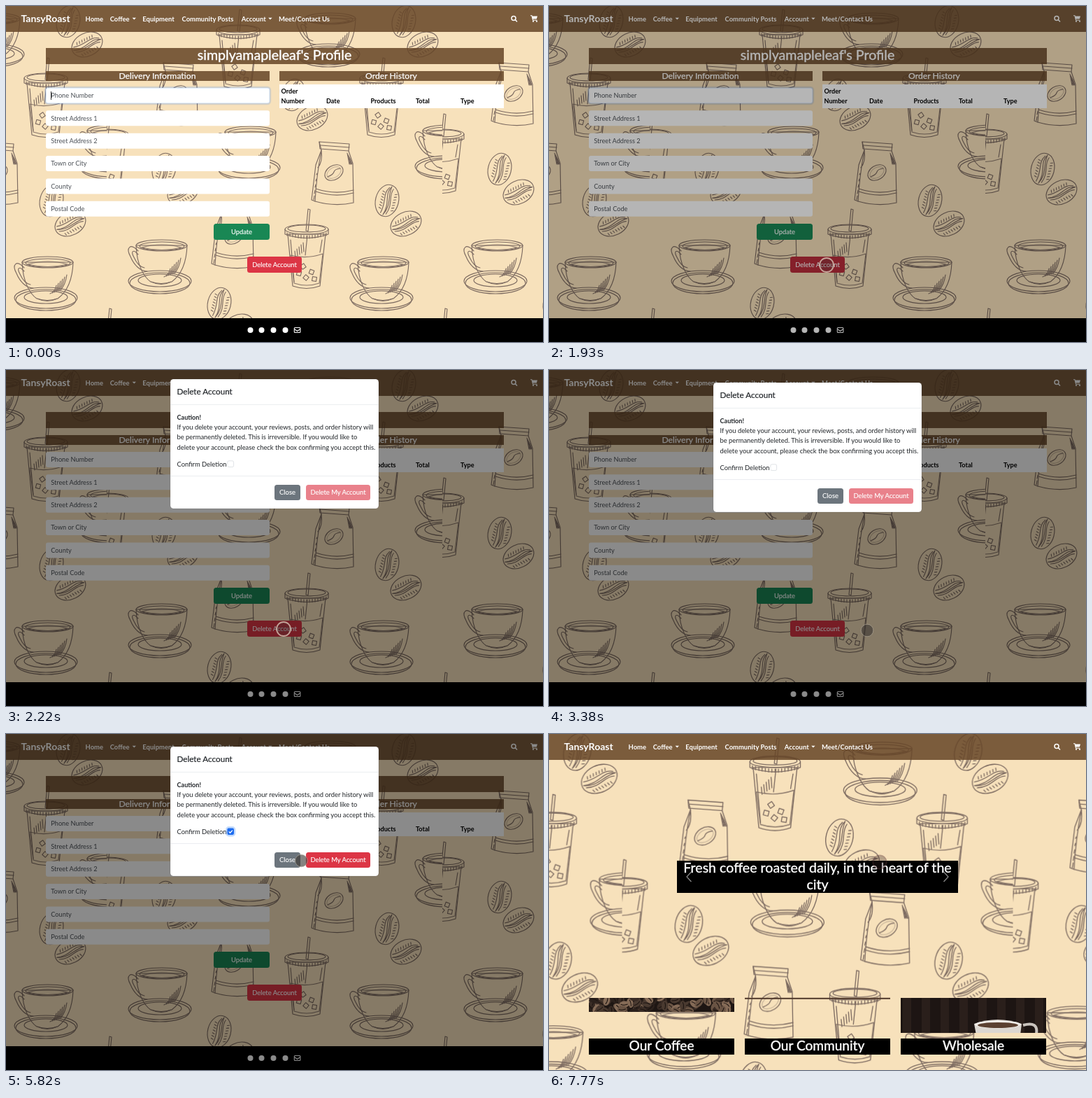
Write an HTML page that moves like this. It is 768 by 480 pixels and loops after 8000 ms.

```html
<!DOCTYPE html>
<html lang="en">
<head>
<meta charset="utf-8">
<title>Profile page</title>
<style>
  html, body { margin: 0; width: 100%; height: 100%; overflow: hidden; background: #f7e1bb; }
  svg { display: block; width: 768px; height: 480px; }
  text { font-family: Lato, "Open Sans", sans-serif; white-space: pre; }
  .ink { fill: none; stroke: #7c6a60; stroke-width: 1.15; stroke-linecap: round; stroke-linejoin: round; }
  .ink .dark { fill: #7c6a60; }
  .ink .paper { fill: #f7e1bb; }
  .ink .thin { stroke-width: .7; }
</style>
</head>
<body>
<svg id="stage" viewBox="0 0 768 480" xmlns="http://www.w3.org/2000/svg"></svg>
<script>
const BROWN = 'rgba(103,70,40,.86)', WHITE = '#fff', GREY = '#4c5157', INK = '#212529';
const LOOP = 8000;

// ---- drawing helpers -------------------------------------------------
const rect = (x, y, w, h, fill, rx = 0, more = '') =>
  `<rect x="${x}" y="${y}" width="${w}" height="${h}" rx="${rx}" fill="${fill}" ${more}/>`;
const path = (d, more = '') => `<path d="${d}" ${more}/>`;
const ellipse = (x, y, rx, ry, more = '') =>
  `<ellipse cx="${x}" cy="${y}" rx="${rx}" ry="${ry}" ${more}/>`;
const group = (body, more = '') => `<g ${more}>${body}</g>`;
const text = (x, y, size, str, { fill = WHITE, mid = false, weight = 400, heavy = 0 } = {}) =>
  `<text x="${x}" y="${y}" font-size="${size}" font-weight="${weight}" fill="${fill}"` +
  (mid ? ' text-anchor="middle"' : '') +
  (heavy ? ` stroke="${fill}" stroke-width="${heavy}"` : '') + `>${str}</text>`;
const repeat = (n, fn) => Array.from({ length: n }, (_, i) => fn(i)).join('');
const place = (list, id) => list.map(([x, y]) => `<use href="#${id}" x="${x}" y="${y}"/>`).join('');

// ---- coffee wallpaper ------------------------------------------------
const cup =
  ellipse(0, 60, 45, 15, 'class="paper"') + ellipse(0, 63, 43, 15) + ellipse(0, 59, 31, 9, 'class="thin"') +
  path('M-31 17C-42 5-49 12-42 25C-37 37-28 46-18 46M-31 22C-38 14-42 17-37 26C-33 35-27 40-22 41') +
  path('M-34 9C-33 38-22 55-13 61Q2 66 17 61C28 53 38 38 39 9Z', 'class="paper"') +
  path('M-12 61Q2 68 16 61') +
  ellipse(2.5, 9, 36.5, 8, 'class="paper"') + ellipse(3, 10, 32, 6) +
  path('M-26 12Q3 4 31 12Q3 19-26 12Z', 'class="dark" opacity=".85"') +
  repeat(6, i => path(`M${30 - i * 3} ${27 + i * 3}q-2 ${14 - i} -9 ${22 - i * 2}`, 'class="thin"'));

const glass =
  path('M-27 36L-20 110Q0 117 19 110L27 36Z', 'class="paper"') +
  path('M-23 66Q0 72 23 64L18 106Q0 112-18 106Z', 'class="dark" opacity=".88"') +
  [[-11, 92, 15], [-1, 98, 40], [7, 90, 20], [-5, 82, 55], [11, 100, 10]].map(([x, y, a]) =>
    `<rect x="${x - 3}" y="${y - 3}" width="6" height="6" class="paper" transform="rotate(${a} ${x} ${y})"/>`).join('') +
  path('M-23 44L-18 104M22 44L19 62', 'class="thin"') +
  repeat(5, i => path(`M${-17 + i * 3} ${60 - i * 3}l1 ${9 + i}`, 'class="thin"')) +
  path('M-31 29V36Q0 47 31 36V29', 'class="paper"') +
  ellipse(0, 29, 31, 7, 'class="paper"') + ellipse(0, 28, 27, 5, 'class="thin"') +
  repeat(15, i => path(`M${-28 + i * 4} ${34 + 4 * Math.sin(i * Math.PI / 14)}v4`, 'class="thin"')) +
  path('M2 0L-1 31L2 32L5 1Z', 'class="paper"') + path('M1 38L-2 66', 'class="thin"');

const bag =
  path('M-20 1L23 4L22 14L28 32L29 88Q2 94-26 86L-31 84L-25 34L-17 13Z', 'class="paper"') +
  path('M-20 1L-19 11L22 14M-18 6L23 9M-17 13Q-24 50-26 86M-17 13Q-15 30-22 38') +
  ellipse(1, 45, 14, 10, 'transform="rotate(-32 1 45)"') +
  ellipse(1, 45, 11, 7, 'class="dark" opacity=".35" transform="rotate(-32 1 45)"') +
  path('M-8 51Q0 48 1 44T10 39') +
  path('M-25 68Q2 77 29 70M-25 72Q2 81 29 74') +
  repeat(5, i => path(`M${-27 + i} ${78 - i * 8}l-1 ${6 - i}M${20 + i} ${17 + i * 2}l3 ${16 - i * 2}`, 'class="thin"'));

const bean =
  ellipse(0, 0, 16.5, 23, 'class="paper"') +
  path('M2-21C-7-8 6 2-1 21C8 6-1-6 2-21Z', 'class="dark"') +
  path('M5-18C0-7 10 3 3 19M-1-19C-9-8 0 2-5 19', 'class="thin"') +
  repeat(7, i => path(`M-9 ${-12 + i * 4}l3 1M9 ${-11 + i * 4}l3 -1`, 'class="thin"'));
const beans =
  group(bean, 'transform="rotate(14)"') + group(bean, 'transform="translate(27 33) rotate(64)"');

const tile =
  place([[76, 333], [393, 357], [486, 169], [203, 171], [317, 9]], 'cup') +
  place([[0, 154], [286, 290], [393, 74], [188, 5], [2, 432]], 'glass') +
  place([[324, 193], [101, 80], [181, 284]], 'bag') +
  place([[82, 233], [401, 278], [267, 127], [425, 22], [161, 425]], 'beans');

const defs = `<defs>
  <g id="cup">${cup}</g><g id="glass">${glass}</g><g id="bag">${bag}</g><g id="beans">${beans}</g>
  <pattern id="paper" width="480" height="480" patternUnits="userSpaceOnUse" patternTransform="translate(144)">
    <g class="ink">${tile}</g></pattern>
  <pattern id="paperBig" href="#paper" patternTransform="translate(104.5) scale(1.1646)"/>
  <clipPath id="strip">${rect(57, 377, 208, 20)}</clipPath>
  <clipPath id="shot">${rect(503, 377, 208, 50)}</clipPath>
</defs>`;

const wallpaper = id => rect(0, 0, 768, 480, '#f7e1bb') + rect(0, 0, 768, 480, `url(#${id})`);

// ---- shared header ---------------------------------------------------
const links = [[113.5, 'Home'], [148.7, 'Coffee'], [195.3, 'Equipment'], [251.5, 'Community Posts'],
  [336.8, 'Account'], [390, 'Meet/Contact Us']];
const nav = rect(0, 0, 768, 37, BROWN) +
  text(21.5, 23, 14, 'TansyRoast', { weight: 700 }) +
  links.map(([x, s]) => text(x, 21.6, 9.45, s, { weight: 700 })).join('') +
  [180.6, 375.2].map(x => path(`M${x} 16.8h5.4l-2.7 2.8z`, `fill="${WHITE}"`)).join('') +
  group('<circle cx="726" cy="17.5" r="3"/>' + path('M728.3 19.8L731 22.6'),
    `fill="none" stroke="${WHITE}" stroke-width="1.5"`) +
  path('M750 13.8h2l1.6 6.4h6', `fill="none" stroke="${WHITE}" stroke-width="1.1"`) +
  path('M752 14.4h8l-1.2 4.2h-5.8z', `fill="${WHITE}"`) +
  `<circle cx="754" cy="22" r="1.1" fill="${WHITE}"/><circle cx="759" cy="22" r="1.1" fill="${WHITE}"/>`;

// ---- profile page ----------------------------------------------------
const fields = ['Phone Number', 'Street Address 1', 'Street Address 2', 'Town or City', 'County', 'Postal Code'];
const button = (x, y, w, h, fill, label, more = '') =>
  group(rect(x, y, w, h, fill, 3.5) +
    text(x + w / 2, y + h / 2 + 3.4, 9.4, label, { mid: true, heavy: .15 }), more);

const profile = wallpaper('paper') + nav +
  rect(57, 60, 655, 23, BROWN) + rect(57, 93, 320, 14, BROWN) + rect(391, 93, 321, 14, BROWN) +
  text(384, 77.3, 19.6, 'simplyamapleleaf\'s Profile', { mid: true, heavy: .4 }) +
  text(216.5, 103.6, 12.2, 'Delivery Information', { mid: true, heavy: .25 }) +
  text(551, 103.6, 12.2, 'Order History', { mid: true, heavy: .25 }) +
  rect(391, 112, 321, 34, WHITE) +
  [[393.5, 125, 'Order'], [393.5, 139, 'Number'], [458, 139, 'Date'], [521.5, 139, 'Products'],
    [586, 139, 'Total'], [650, 139, 'Type']]
    .map(([x, y, s]) => text(x, y, 9.1, s, { fill: '#000', weight: 700 })).join('') +
  fields.map((s, i) => {
    const y = 117 + i * 32.35;
    return rect(57, y, 320, 22, WHITE, 3) + text(64.3, y + 14.4, 9.2, s, { fill: GREY });
  }).join('') +
  group(rect(56, 116, 322, 24, 'none', 4, 'stroke="#0d6efd" stroke-opacity=".28" stroke-width="2.4"') +
    rect(57, 117, 320, 22, 'none', 3, 'stroke="#86b7fe" stroke-width=".8"'), 'id="ring"') +
  rect(64, 122, .8, 12, '#000', 0, 'id="caret"') +
  button(297, 311, 80, 23, '#198754', 'Update') +
  button(345, 358, 78, 23, '#dc3545', 'Delete Account', 'id="remove"') +
  rect(0, 446, 768, 34, '#000') +
  [349.5, 365.5, 382.5, 399.5].map(x => `<circle cx="${x}" cy="463" r="4" fill="${WHITE}"/>`).join('') +
  group(rect(412.3, 459.5, 8.6, 7, 'none', 1) + path('M412.5 461.5l4.1 3 4.1-3'),
    `fill="none" stroke="${WHITE}" stroke-width="1.1"`);

// ---- confirmation dialog ---------------------------------------------
const body = ['If you delete your account, your reviews, posts, and order history will',
  'be permanently deleted. This is irreversible. If you would like to',
  'delete your account, please check the box confirming you accept this.'];
const dark = { fill: INK };
const dialog = rect(235, 18, 298, 185, WHITE, 4.5, 'stroke="rgba(0,0,0,.2)" stroke-width=".6"') +
  rect(235, 54.3, 298, .6, '#dee2e6') + rect(235, 156, 298, .6, '#dee2e6') +
  text(244.5, 40.2, 11.7, 'Delete Account', { fill: INK, heavy: .2 }) +
  text(244.5, 75.6, 9.1, 'Caution!', { fill: INK, weight: 700 }) +
  body.map((s, i) => text(244.5, 90 + i * 14.4, 9.4, s, dark)).join('') +
  text(244.5, 142.8, 9.4, 'Confirm Deletion', dark) +
  rect(316.8, 134.8, 8.8, 8.8, WHITE, 2, 'stroke="#ccd0d6" stroke-width=".6"') +
  group(rect(315.2, 133.2, 12, 12, 'none', 3.5, 'id="halo" stroke="#0d6efd" stroke-opacity=".25" stroke-width="2.4"') +
    rect(316.4, 134.4, 9.6, 9.6, '#1d6cf0', 2) +
    path('M318.7 139.4l1.8 1.8 3.4-3.6', `fill="none" stroke="${WHITE}" stroke-width="1.3"`), 'id="tick"') +
  button(384, 169, 37, 22, '#6c757d', 'Close') +
  button(429, 169, 92, 22, '#dc3545', 'Delete My Account', 'id="confirm"');

// ---- home page -------------------------------------------------------
let seed = 7;
const rnd = () => (seed = seed * 16807 % 2147483647) / 2147483647;
const roast = ['#2c211c', '#4a3a30', '#6a5444', '#3a2c25', '#856b57'];
const card = (x, label) => rect(x, 435, 208, 23, '#000') +
  text(x + 104, 452, 19.1, label, { mid: true, heavy: .4 });
const home = wallpaper('paperBig') + nav +
  rect(183, 181, 402, 46, '#000') +
  text(384, 198.3, 19.6, 'Fresh coffee roasted daily, in the heart of the', { mid: true, heavy: .35 }) +
  text(384, 222, 19.6, 'city', { mid: true, heavy: .35 }) +
  path('M203.5 197l-6.5 7 6.5 7M564.5 197l6.5 7-6.5 7', 'fill="none" stroke="#8d8d8d" stroke-width="1.2"') +
  group(rect(57, 377, 208, 20, '#1e1613') + repeat(85, i => {
    const x = 57 + rnd() * 208, y = 377 + rnd() * 20, a = rnd() * 180;
    return group(ellipse(0, 0, 7, 4.6, `fill="${roast[i % 5]}"`) + path('M-5 0Q0-2 5 0', 'fill="none" stroke="#1a120f"'),
      `transform="translate(${x} ${y}) rotate(${a})"`);
  }), 'clip-path="url(#strip)"') +
  rect(280, 376.8, 208, 2, '#50392b') +
  group(rect(503, 377, 208, 50, '#1d1513') +
    repeat(8, i => rect(506 + i * 27, 377, 12, 50, '#2a1f1b')) +
    path('M678 416q22-6 19 12', 'fill="none" stroke="#c9c3bd" stroke-width="4"') +
    path('M608 414Q641 402 676 414L674 430H611Z', 'fill="#dcd7d1"') +
    ellipse(642, 415, 33, 5.5, 'fill="#f1ede8"') + ellipse(642, 416, 29, 4, 'fill="#5b4030"'), 'clip-path="url(#shot)"') +
  card(57, 'Our Coffee') + card(280, 'Our Community') + card(503, 'Wholesale');

const stage = document.getElementById('stage');
stage.innerHTML = defs + group(profile + rect(0, 0, 768, 480, '#000', 0, 'id="shade"') + group(dialog, 'id="dialog"'), 'id="profile"') +
  group(home, 'id="home"') + '<circle id="dot"/>';

// ---- timeline --------------------------------------------------------
// Bursts of screen updates: start, end, count.
const bursts = [[0, 0, 1], [90, 90, 1], [400, 480, 2], [780, 1540, 9], [1640, 2320, 8], [2710, 3380, 8],
  [3680, 4440, 9], [4540, 4640, 2], [4830, 4830, 1], [5030, 5030, 1], [5230, 5230, 1], [5520, 6010, 6],
  [6200, 6380, 3], [6580, 6770, 3], [7770, 7770, 1]];
const ticks = bursts.flatMap(([a, b, n]) =>
  Array.from({ length: n }, (_, i) => n < 2 ? a : Math.floor((a + (b - a) * i / (n - 1)) / 10) * 10));

const route = [[400, 740, 298], [480, 729, 292], [780, 705, 312], [870, 645, 350], [960, 556, 384], [1060, 474, 373],
  [1160, 430, 368], [1250, 408, 369], [1540, 397, 370], [2320, 397, 370], [2710, 396, 345], [2800, 398, 275],
  [2900, 406, 208], [3000, 420, 182], [3090, 438, 202], [3190, 451, 275], [3280, 456, 345], [3380, 455, 372],
  [3680, 453, 374], [3870, 430, 300], [4060, 385, 210], [4250, 340, 155], [4440, 326, 145], [4640, 321, 141],
  [4830, 319, 140], [5030, 316, 140], [5230, 316, 140], [5520, 328, 146], [5710, 390, 172], [6010, 487, 199],
  [6200, 478, 194], [6380, 457, 181], [6580, 466, 182], [6770, 473, 183]];
const ringKeys = [[0, .5], [90, 1], [1540, 1], [1640, .5], [1930, .45], [2020, 0]];
const shadeKeys = [[1830, 0], [1930, .29], [2020, .46]];
const fadeKeys = [[2020, 0], [2120, .55], [2220, 1]];
const slideKeys = [[2020, -30], [2120, -16], [2220, -5], [2320, 0]];

function at(keys, t, col = 1) {
  const i = keys.findIndex(k => k[0] > t);
  if (i < 0) return keys[keys.length - 1][col];
  if (!i) return keys[0][col];
  const a = keys[i - 1], b = keys[i];
  return a[col] + (b[col] - a[col]) * (t - a[0]) / (b[0] - a[0]);
}
const within = (t, ...spans) => spans.some(([a, b]) => t >= a && t < b);
const el = id => document.getElementById(id);
const set = (id, attrs) => { for (const k in attrs) el(id).setAttribute(k, attrs[k]); };
const show = (id, on) => set(id, { visibility: on ? 'inherit' : 'hidden' });

function render(t) {
  const away = t >= 7770;
  set('profile', { display: away ? 'none' : 'inline' });
  set('home', { display: away ? 'inline' : 'none' });
  set('ring', { opacity: at(ringKeys, t) });
  show('caret', within(t, [0, 400], [960, 1540]));
  el('remove').firstChild.setAttribute('fill', within(t, [1250, 2020]) ? '#bb2d3b' : '#dc3545');
  set('shade', { opacity: at(shadeKeys, t) });
  set('dialog', { opacity: at(fadeKeys, t), transform: `translate(0 ${at(slideKeys, t)})` });
  show('tick', t >= 5030);
  show('halo', within(t, [5030, 6580]));
  set('confirm', { opacity: t < 5030 ? .62 : 1 });
  el('confirm').firstChild.setAttribute('fill', t >= 6580 ? '#bb2d3b' : '#dc3545');

  const onLight = within(t, [1640, 2710]), onDark = t >= 6770;
  const look = onLight ? { r: 10, fill: 'rgba(60,50,50,.25)', stroke: 'rgba(215,195,180,.8)', 'stroke-width': 1.8 }
    : onDark ? { r: 9.8, fill: 'rgba(50,30,32,.65)', stroke: 'rgba(95,55,55,.8)', 'stroke-width': 1.6 }
    : { r: 8.8, fill: 'rgba(60,55,50,.62)', stroke: 'rgba(190,180,165,.55)', 'stroke-width': 1 };
  set('dot', { cx: at(route, t), cy: at(route, t, 2), opacity: away ? .5 : 1, ...look });
  show('dot', t >= 400);
}

const began = performance.now();
let last = -1;
function frame() {
  const now = (performance.now() - began) % LOOP;
  const t = ticks.filter(k => k <= now).pop();
  if (t !== last) render(last = t);
  requestAnimationFrame(frame);
}
frame();
</script>
</body>
</html>
```
